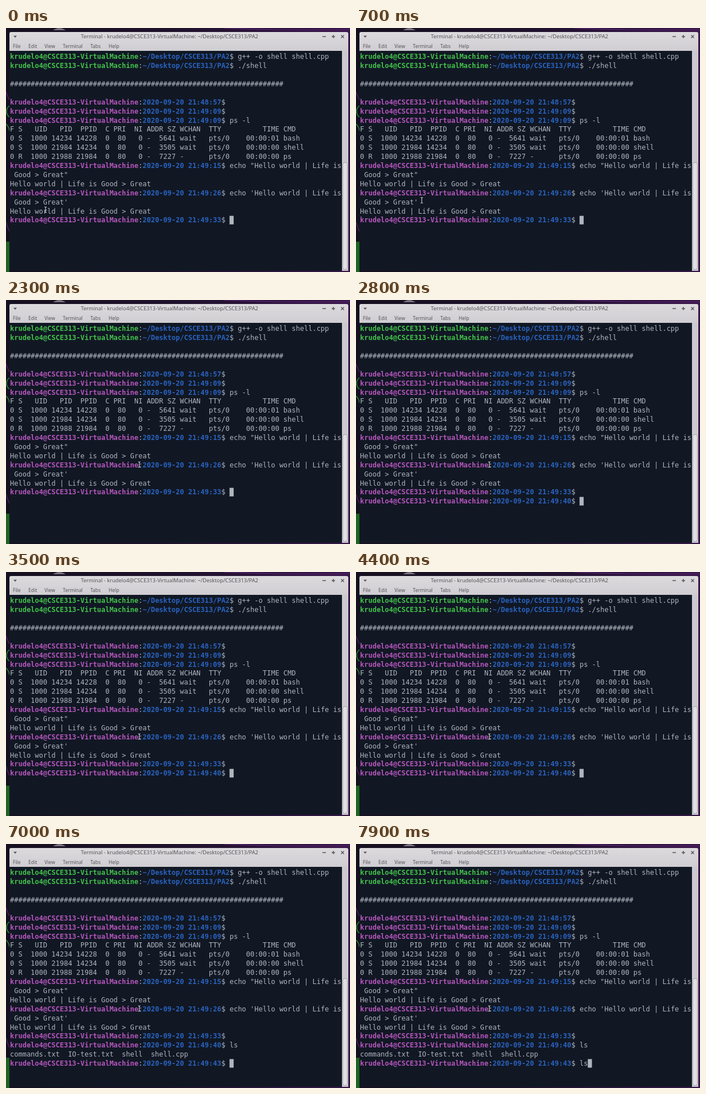
Recreate the animation shown at these times as an HTML page. Size 600 by 427 pixels, loop 8 s.

```html
<!DOCTYPE html>
<html lang="en">
<head>
<meta charset="utf-8">
<title>Terminal</title>
<style>
  html, body { margin: 0; width: 100%; height: 100%; overflow: hidden; background: #0c0a16; }
  svg { display: block; width: 100vw; height: 100vh; }
  text { white-space: pre; }
  .ui { font-family: "Noto Sans", "Open Sans", sans-serif; fill: #55555a; }
  .term { font: 12px "DejaVu Sans Mono", monospace; fill: #b0b5bd; }
  .user { font-weight: bold; fill: #b655bd; }
  .home { font-weight: bold; fill: #43c24a; }
  .path { font-weight: bold; fill: #2a62c0; }
</style>
</head>
<body>
<svg viewBox="0 0 600 427" preserveAspectRatio="none">
  <defs>
    <linearGradient id="desk">
      <stop offset="0" stop-color="#15101f"/>
      <stop offset=".5" stop-color="#1f122c"/>
      <stop offset="1" stop-color="#38164a"/>
    </linearGradient>
    <linearGradient id="bar" x2="0" y2="1">
      <stop offset="0" stop-color="#dcdadd"/>
      <stop offset="1" stop-color="#cfcdd1"/>
    </linearGradient>
  </defs>
  <rect width="600" height="427" fill="url(#desk)"/>
  <path d="M0 374h6v53H0z" fill="#1f6322"/>
  <path d="M82 4Q93-4 104 4z" fill="#77737c"/>
  <g fill="none" stroke-width="1.5">
    <path d="M6 136Q1 140 1 146T6 156M0 168Q5 172 6 180" stroke="#2f8a35"/>
    <path d="M0 112Q4 122 6 126M0 340Q4 352 6 356" stroke="#4d2263"/>
    <path d="M380 0Q480 5 600 3" stroke="#54206a"/>
  </g>

  <path d="M6 41V10q0-3 3-3H594q3 0 3 3V41z" fill="url(#bar)"/>
  <rect x="6" y="40" width="580" height="385" fill="#111824"/>
  <rect x="586" y="40" width="11" height="385" fill="#cccad0"/>
  <rect x="587.5" y="235.5" width="8" height="187" rx="3" fill="#e0dfe3" stroke="#a2a0a8"/>

  <path d="M13 13.5h6l-3 3.5z" fill="#55555a"/>
  <path d="M552 15h6M568 15h6M571 12v6M584.5 12.5l5 5m0-5l-5 5" fill="none" stroke="#55555a" stroke-width="1.4"/>
  <g class="ui" id="ui"></g>
  <g class="term" id="lines"></g>
  <rect id="block" width="7.2" height="15" fill="#b0b5bd"/>
  <path id="mouse" d="M-2-5Q0-5 0-3.5Q0-5 2-5M0-4V4M-2 5Q0 5 0 3.5Q0 5 2 5" fill="none" stroke="#d0d3d8" stroke-width="1.1"/>
</svg>
<script>
const LOOP = 8000, LEFT = 7, COL = 7.224, ROW = 15.9, BASE = 54.2;
const HOST = 'krudelo4@CSCE313-VirtualMachine';
const DIR = '~/Desktop/CSCE313/PA2';
const $ = id => document.getElementById(id);

function add(parent, tag, attrs, content = '') {
  const el = document.createElementNS('http://www.w3.org/2000/svg', tag);
  for (const key in attrs) el.setAttribute(key, attrs[key]);
  el.textContent = content;
  return parent.appendChild(el);
}

add($('ui'), 'text', { x: 130.5, y: 18.3, 'font-size': 9.25 }, `Terminal - ${HOST}: ${DIR}`);
[['File', 12], ['Edit', 39], ['View', 67], ['Terminal', 99], ['Tabs', 147], ['Help', 179]]
  .forEach(([label, x]) => add($('ui'), 'text', { x, y: 35, 'font-size': 8.5 }, label));

let rows = 0;
const rowY = row => BASE + row * ROW;

// Each row returns its last text run so that typing can change it.
function print(...runs) {
  const line = add($('lines'), 'text', { x: LEFT, y: rowY(rows++) });
  let last;
  for (const [content, cls] of runs) last = add(line, 'tspan', cls ? { class: cls } : {}, content);
  return { line, last };
}
const out = s => print([s]);
const shell = cmd => print([HOST, 'home'], [':'], [DIR, 'path'], ['$ ' + cmd]);
const prompt = (time, cmd = '') => print([HOST, 'user'], [':'], ['2020-09-20 21:' + time, 'path'], ['$ ' + cmd]);

shell('g++ -o shell shell.cpp');
shell('./shell');
out('');
out('#'.repeat(66));
out('');
prompt('48:57');
prompt('49:09');
prompt('49:09', 'ps -l');
out('F S   UID   PID  PPID  C PRI  NI ADDR SZ WCHAN  TTY          TIME CMD');
out('0 S  1000 14234 14228  0  80   0 -  5641 wait   pts/0    00:00:01 bash');
out('0 S  1000 21984 14234  0  80   0 -  3505 wait   pts/0    00:00:00 shell');
out('0 R  1000 21988 21984  0  80   0 -  7227 -      pts/0    00:00:00 ps');
for (const [time, q] of [['49:15', '"'], ['49:26', "'"]]) {
  prompt(time, `echo ${q}Hello world | Life is`);
  out(` Good > Great${q}`);
  out('Hello world | Life is Good > Great');
}
prompt('49:33');
const second = prompt('49:40');
const listing = out('commands.txt  IO-test.txt  shell  shell.cpp');
const third = prompt('49:43');

const ENTER = 2800, LIST = 5200;
const typed = (t, start) => 'ls'.slice(0, t < start ? 0 : t < start + 100 ? 1 : 2);
const show = (row, on) => row.line.setAttribute('visibility', on ? 'visible' : 'hidden');

// Pointer stops: time, x, y
const stops = [[200, 69, 318], [1500, 207, 268], [1650, 207, 268], [2150, 232.5, 288]];
function pointer(t) {
  if (t <= stops[0][0]) return stops[0].slice(1);
  const i = stops.findIndex(s => s[0] > t);
  if (i < 0) return stops[stops.length - 1].slice(1);
  const [a, b] = [stops[i - 1], stops[i]];
  const p = (t - a[0]) / (b[0] - a[0]), e = p * p * (3 - 2 * p);
  return [1, 2].map(k => a[k] + (b[k] - a[k]) * e);
}

function draw(t) {
  const first = typed(t, 4700), next = typed(t, 7800);
  show(second, t >= ENTER);
  show(listing, t >= LIST);
  show(third, t >= LIST);
  second.last.textContent = '$ ' + first;
  third.last.textContent = '$ ' + next;

  const row = t < ENTER ? 18 : t < LIST ? 19 : 21;
  const col = 53 + (t < LIST ? first : next).length;
  $('block').setAttribute('x', LEFT + col * COL);
  $('block').setAttribute('y', rowY(row) - 11.7);
  $('mouse').setAttribute('transform', `translate(${pointer(t)})`);
}

const start = performance.now();
function tick() {
  draw((performance.now() - start) % LOOP);
  requestAnimationFrame(tick);
}
tick();
</script>
</body>
</html>
```
